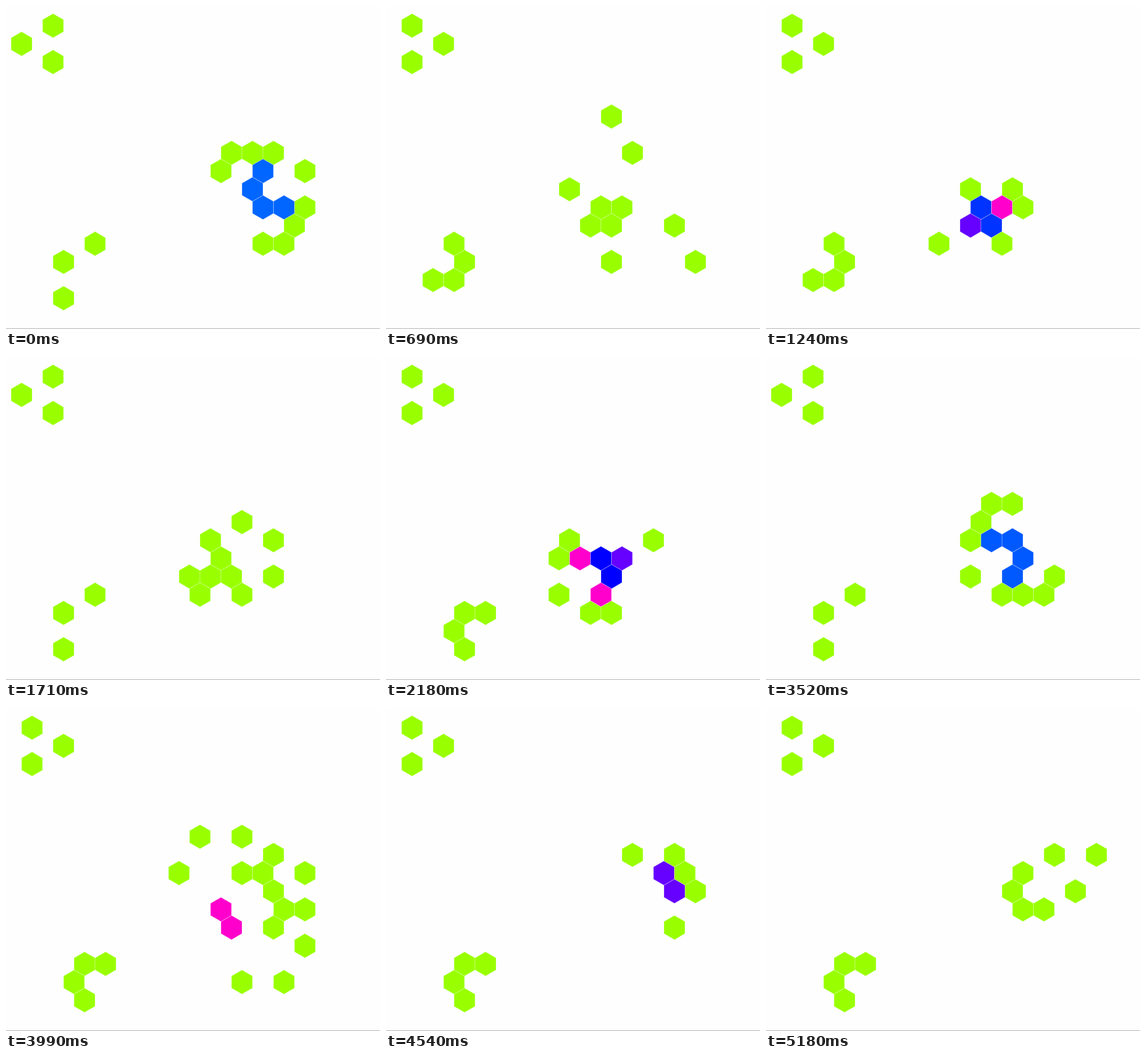
Animation of 588 by 508 pixels, one loop 5.25 s. Source, as an HTML page with a canvas:

```html
<!DOCTYPE html>
<html lang="en">
<head>
<meta charset="utf-8">
<title>Hexagonal life</title>
<style>
  html, body { margin: 0; width: 100%; height: 100%; overflow: hidden; background: #fefefe; }
  canvas { display: block; }
</style>
</head>
<body>
<canvas id="stage" width="588" height="508"></canvas>
<script>
const ctx = document.getElementById('stage').getContext('2d');

// Cells sit on half columns u and rows r; a row's cells are two half columns apart.
const HALF = 16.5, RADIUS = 19.05, LEFT = 24.5, TOP = 31;
const NEAR = [[-2, 0], [2, 0], [-1, -1], [1, -1], [-1, 1], [1, 1]];
const GENERATIONS = 36, LOOP = 5250, OLD = 12;

const young = [
  [3, 0], [0, 1], [3, 2],
  [7, 12], [4, 13], [4, 15],
  [20, 7], [22, 7], [24, 7], [19, 8], [27, 8],
  [27, 10], [26, 11], [23, 12], [25, 12]
];
const old = [[23, 8], [22, 9], [23, 10], [25, 10]];

const key = (u, r) => u + ',' + r;

// Born with 2 neighbours, survives with 3 or 4.
function step(cells) {
  const counts = new Map();
  for (const k of cells.keys()) {
    const [u, r] = k.split(',').map(Number);
    for (const [du, dr] of NEAR) {
      const n = key(u + du, r + dr);
      counts.set(n, (counts.get(n) || 0) + 1);
    }
  }
  const next = new Map();
  for (const [k, n] of counts) {
    if (cells.has(k)) {
      if (n === 3 || n === 4) next.set(k, cells.get(k) + 1);
    } else if (n === 2) {
      next.set(k, 0);
    }
  }
  return next;
}

function duration(g) {
  if (g === 0 || g === GENERATIONS - 1) return 70;
  if (g % 12 === 5) return 80;
  if (g < 30) return g % 3 ? 150 : 170;
  return g === 32 || g === 34 ? 170 : 150;
}

// New cells are green; survivors go from pink to blue, halving the distance each time.
const colour = age => `hsl(${age ? 216 + 192 / 2 ** age : 84}, 100%, 50%)`;

function hexagon(u, r, fill) {
  const x = LEFT + u * HALF, y = TOP + r * RADIUS * 1.5;
  ctx.beginPath();
  for (let i = 0; i < 6; i++) {
    const a = Math.PI * (i / 3 + 1 / 6);
    ctx.lineTo(x + RADIUS * Math.cos(a), y + RADIUS * Math.sin(a));
  }
  ctx.closePath();
  ctx.fillStyle = fill;
  ctx.fill();
  ctx.stroke();
}

function draw(cells) {
  ctx.fillStyle = '#fefefe';
  ctx.fillRect(0, 0, 588, 508);
  ctx.fillStyle = '#b8b8b8';
  ctx.fillRect(0, 507, 588, 1);
  ctx.strokeStyle = 'rgba(255, 255, 255, 0.3)';
  ctx.lineWidth = 1;
  for (const [k, age] of cells) hexagon(...k.split(',').map(Number), colour(age));
}

const history = [new Map([
  ...young.map(c => [key(...c), 0]),
  ...old.map(c => [key(...c), OLD])
])];
const ends = [duration(0)];
for (let g = 1; g < GENERATIONS; g++) {
  history.push(step(history[g - 1]));
  ends.push(ends[g - 1] + duration(g));
}

const start = performance.now();
let shown = -1;
function tick() {
  const t = (performance.now() - start) % LOOP;
  const g = ends.findIndex(end => t < end);
  if (g !== shown) draw(history[shown = g]);
  requestAnimationFrame(tick);
}
tick();
</script>
</body>
</html>
```
